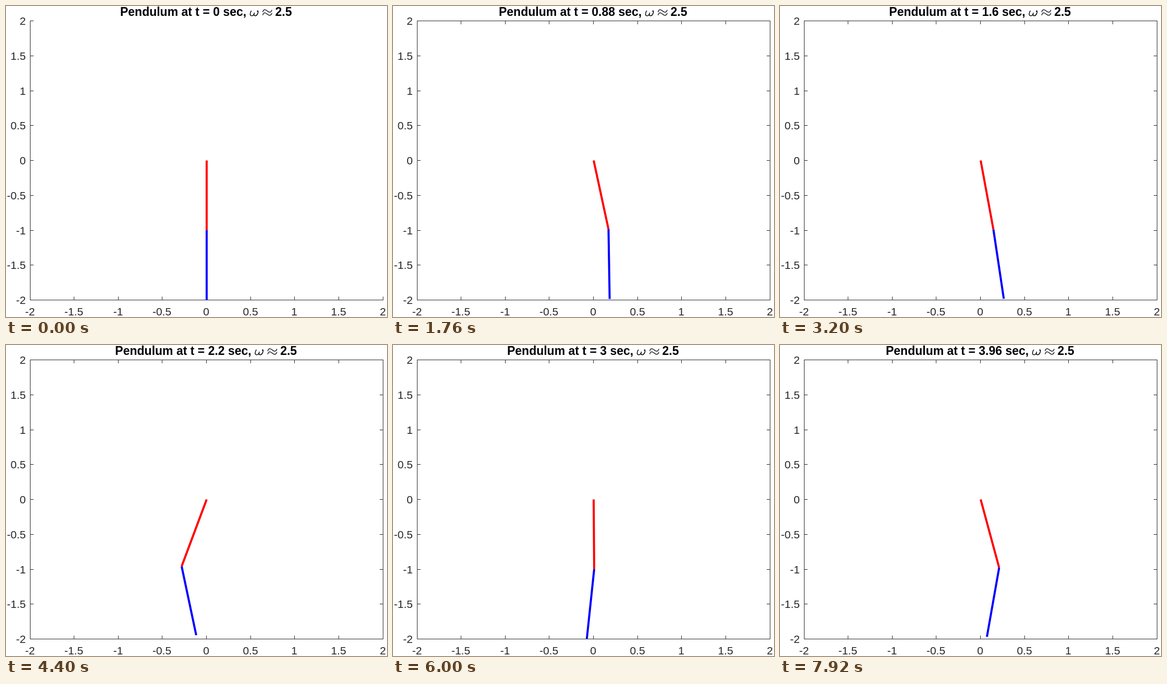
Write an HTML page with a canvas that moves like this. It is 731 by 595 pixels and loops after 8 s.

```html
<!DOCTYPE html>
<html lang="en">
<head>
<meta charset="utf-8">
<title>Pendulum</title>
<style>
html, body { margin: 0; width: 100%; height: 100%; overflow: hidden; background: #fff; }
canvas { display: block; }
</style>
</head>
<body>
<canvas id="stage" width="731" height="595"></canvas>
<script>
const ctx = document.getElementById('stage').getContext('2d');
const LOOP = 8000, STEP = 80, DT = 0.04;
const LEFT = 46, RIGHT = 723, TOP = 28, BOTTOM = 562, TICK = 6.5;
const CX = 385, CY = 295.5, SX = 169.25, SY = 133.5;
const FONT = '"Liberation Sans", Arial, sans-serif';
const INK = '#262626';

// time in seconds, upper angle, lower angle (radians from vertical)
const POSES = [
  [0, 0, 0], [0.45, 0.028, 0.01], [0.88, 0.169, 0.013], [1.22, 0.25, 0.051],
  [1.6, 0.145, 0.118], [1.9, -0.078, 0.161], [2.2, -0.2876, 0.166],
  [2.4, -0.351, 0.14], [2.6, -0.3185, 0.056], [2.95, -0.047, -0.061],
  [3.12, 0.14, -0.141], [3.4, 0.42, -0.278], [3.57, 0.458, -0.308],
  [3.75, 0.407, -0.273], [3.96, 0.211, -0.139]
];

function slope(i, k) {
  if (i === 0) return 0;
  const rate = (a, b) => (POSES[b][k] - POSES[a][k]) / (POSES[b][0] - POSES[a][0]);
  const last = POSES.length - 1;
  if (i === last) return 1.4 * rate(i - 1, i);
  const h0 = POSES[i][0] - POSES[i - 1][0], h1 = POSES[i + 1][0] - POSES[i][0];
  return (rate(i - 1, i) * h1 + rate(i, i + 1) * h0) / (h0 + h1);
}

// cubic Hermite interpolation between poses
function angle(t, k) {
  let i = 0;
  while (i < POSES.length - 2 && t > POSES[i + 1][0]) i++;
  const h = POSES[i + 1][0] - POSES[i][0];
  const u = (t - POSES[i][0]) / h, v = 1 - u;
  return v * v * (1 + 2 * u) * POSES[i][k] + u * u * (3 - 2 * u) * POSES[i + 1][k]
    + h * u * v * (v * slope(i, k) - u * slope(i + 1, k));
}

function line(x0, y0, x1, y1, color, width) {
  ctx.strokeStyle = color;
  ctx.lineWidth = width;
  ctx.beginPath();
  ctx.moveTo(x0, y0);
  ctx.lineTo(x1, y1);
  ctx.stroke();
}

function text(s, x, y, align) {
  ctx.textAlign = align;
  ctx.fillText(s, x, y);
}

function drawAxes(boxed) {
  const l = LEFT + 0.5, r = RIGHT + 0.5, t = TOP + 0.5, b = BOTTOM + 0.5;
  const rule = (...p) => line(...p, INK, 1);
  rule(l, t - 0.5, l, b + 0.5);
  rule(l - 0.5, b, r + 0.5, b);
  if (boxed) {
    rule(r, t - 0.5, r, b + 0.5);
    rule(l - 0.5, t, r + 0.5, t);
  }
  ctx.font = '21px ' + FONT;
  ctx.fillStyle = INK;
  for (let i = 0; i <= 8; i++) {
    const x = Math.floor(LEFT + i * (RIGHT - LEFT) / 8) + 0.5;
    const y = Math.round(TOP + i * (BOTTOM - TOP) / 8) + 0.5;
    rule(x, b, x, b - TICK);
    rule(l, y, l + TICK, y);
    if (boxed) {
      rule(x, t, x, t + TICK);
      rule(r, y, r - TICK, y);
    }
    text(String(i / 2 - 2), x - 0.5, 592, 'center');
    text(String(2 - i / 2), 38, y + 7.5, 'right');
  }
}

function drawOmega(x, y) {
  ctx.lineWidth = 1.5;
  ctx.beginPath();
  ctx.moveTo(x + 3.4, y - 10);
  ctx.bezierCurveTo(x + 0.8, y - 7, x - 0.7, y - 0.2, x + 3.8, y - 0.3);
  ctx.bezierCurveTo(x + 6.8, y - 0.3, x + 8.4, y - 3.2, x + 9, y - 6.2);
  ctx.bezierCurveTo(x + 7.6, y - 2.8, x + 8.2, y - 0.3, x + 10.6, y - 0.3);
  ctx.bezierCurveTo(x + 14.3, y - 0.3, x + 17.2, y - 6.6, x + 15.6, y - 9.8);
  ctx.stroke();
  ctx.beginPath();
  ctx.arc(x + 15.2, y - 9.2, 1.3, 0, 7);
  ctx.fill();
}

function drawApprox(x, y) {
  ctx.lineWidth = 1.3;
  for (const dy of [-9.2, -3.2]) {
    ctx.beginPath();
    ctx.moveTo(x, y + dy + 1.8);
    ctx.bezierCurveTo(x + 2, y + dy - 6, x + 7, y + dy - 1.8, x + 9, y + dy);
    ctx.bezierCurveTo(x + 12, y + dy + 2.6, x + 16, y + dy + 3.6, x + 17.6, y + dy - 2.4);
    ctx.stroke();
  }
}

function drawTitle(t) {
  const head = `Pendulum at t = ${Number(t.toFixed(2))} sec, `;
  ctx.font = 'bold 23px ' + FONT;
  ctx.fillStyle = ctx.strokeStyle = '#000';
  const w = ctx.measureText(head).width;
  const x = 384.75 - (w + 83) / 2, base = 19;
  text(head, x, base, 'left');
  drawOmega(x + w, base);
  drawApprox(x + w + 25, base);
  text('2.5', x + w + 49, base, 'left');
}

function drawPendulum(t) {
  const a = angle(t, 1), b = angle(t, 2);
  const x1 = CX + SX * Math.sin(a), y1 = CY + SY * Math.cos(a);
  const x2 = x1 + SX * Math.sin(b), y2 = y1 + SY * Math.cos(b);
  line(CX, CY, x1, y1, '#f00', 4);
  line(x1, y1, x2, y2, '#00f', 4);
}

function draw(ms) {
  const n = Math.floor((ms % LOOP) / STEP), t = n * DT;
  ctx.fillStyle = '#fff';
  ctx.fillRect(0, 0, 731, 595);
  drawAxes(n > 0);
  drawPendulum(t);
  drawTitle(t);
}

let start;
function tick(now) {
  if (start === undefined) start = now;
  draw(Math.max(0, now - start));
  requestAnimationFrame(tick);
}
draw(0);
requestAnimationFrame(tick);
</script>
</body>
</html>
```
